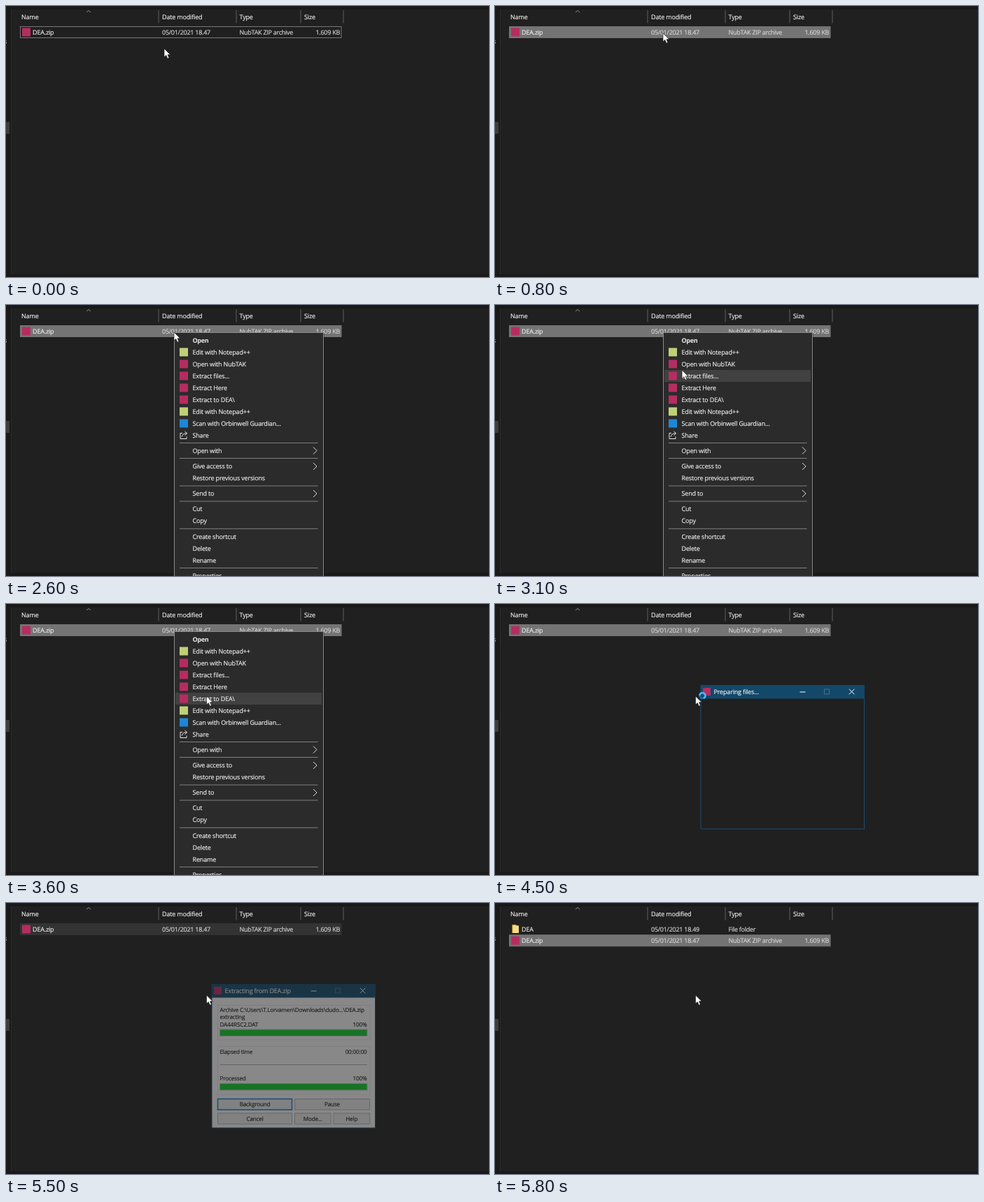
Recreate the animation shown at these times as an HTML page. Size 690 px wide and 388 px high, loop 6.7 s.

```html
<!DOCTYPE html>
<html lang="en">
<head>
<meta charset="utf-8">
<title>Extracting an archive</title>
<style>
  html, body { margin: 0; width: 100%; height: 100%; overflow: hidden; background: #202020; }
  svg { display: block; width: 100vw; height: 100vh; }
  text { font: 9px "Open Sans", "Noto Sans", sans-serif; letter-spacing: -.17px; fill: #ececec;
         stroke: #ececec; stroke-width: .18px; text-rendering: geometricPrecision; white-space: pre; }
  .cell { fill: #d2d2d2; stroke: #d2d2d2; letter-spacing: -.26px; }
  .bold { font-weight: 700; letter-spacing: -.3px; stroke: none; }
  .form text { font-size: 8.2px; letter-spacing: -.2px; fill: #111; stroke: #111; stroke-width: .1px; }
  .end { text-anchor: end; }
  .mid { text-anchor: middle; }
</style>
</head>
<body>
<svg id="stage" viewBox="0 0 690 388"></svg>
<script>
const LOOP = 6700, STEP = 100;
const stage = document.getElementById('stage');

function add(parent, tag, attrs = {}, content) {
  const el = document.createElementNS('http://www.w3.org/2000/svg', tag);
  for (const k in attrs) el.setAttribute(k, attrs[k]);
  if (content !== undefined) el.textContent = content;
  return parent.appendChild(el);
}
const set = (el, attrs) => { for (const k in attrs) el.setAttribute(k, attrs[k]); };
const group = (parent, attrs) => add(parent, 'g', attrs);
const rect = (parent, x, y, width, height, fill, more) =>
  add(parent, 'rect', { x, y, width, height, fill, ...more });
const line = (parent, d, stroke, width = 1) =>
  add(parent, 'path', { d, stroke, 'stroke-width': width, fill: 'none' });
const label = (parent, x, y, str, cls = '') => add(parent, 'text', { x, y, class: cls }, str);
const show = (el, on) => el.setAttribute('visibility', on ? 'visible' : 'hidden');

const clamp = v => Math.max(0, Math.min(1, v));
const ramp = (t, a, b) => clamp((t - a) / (b - a));
const ease = p => p * p * (3 - 2 * p);
const mix = (a, b, p) => a + (b - a) * p;

const ARCHIVER = '#b52d60', EDITOR = '#bfd079', GUARD = '#1d86d6';

// Explorer
rect(stage, 0, 0, 690, 388, '#202020');
rect(stage, 0, 0, 8, 388, '#1a1a1a');
rect(stage, 7, 5, 1, 379, '#2c2c2c');
rect(stage, 0, 0, 690, 5, '#191919');
rect(stage, 0, 384, 690, 4, '#191919');
rect(stage, 0, 166, 5, 17, '#3d3d3d');
label(stage, -3, 54, 's').style.fill = '#b98b62';
line(stage, 'M115 9L118 6.5L121 9', '#8a8a8a');
[218, 329, 421, 482].forEach(x => rect(stage, x - .5, 6, 1, 18.5, '#5e5e5e'));
[[22, 'Name'], [223, 'Date modified'], [333.5, 'Type'], [426, 'Size']]
  .forEach(([x, s]) => label(stage, x, 18.5, s));

function fileRow(name, time, type, size) {
  const g = group(stage);
  const back = rect(g, 20.5, 29.5, 458.5, 16, 'none');
  label(g, 38, 41, name);
  label(g, 223, 41, '05/01/2021 ' + time, 'cell');
  label(g, 333.5, 41, type, 'cell');
  label(g, 477, 41, size, 'cell end');
  return { g, back };
}
const folder = fileRow('DEA', '18.49', 'File folder', '');
add(folder.g, 'path', { d: 'M24.5 31H30L31 32.5H33.5V43H24.5Z', fill: '#e2b84c' });
rect(folder.g, 25.5, 32.5, 8.5, 10.5, '#f8dc82');
const zip = fileRow('DEA.zip', '18.47', 'NubTAK ZIP archive', '1.609 KB');
rect(zip.g, 23, 31.5, 12, 12, ARCHIVER);

// Context menu
const menu = group(stage);
rect(menu, 242, 41, 213, 350, '#000', { opacity: .3 });
rect(menu, 240.5, 39.5, 213, 352, '#2b2b2b', { stroke: '#8a8a8a' });
const hover = rect(menu, 242, 0, 209, 17, '#414141');
const items = [
  [50.5, 'Open'],
  [67.5, 'Edit with Notepad++', EDITOR],
  [84.5, 'Open with NubTAK', ARCHIVER],
  [101.5, 'Extract files...', ARCHIVER],
  [118.5, 'Extract Here', ARCHIVER],
  [135.5, 'Extract to DEA\\', ARCHIVER],
  [152.5, 'Edit with Notepad++', EDITOR],
  [169.5, 'Scan with Orbinwell Guardian...', GUARD],
  [186.5, 'Share'],
  [208.5, 'Open with'], [231, 'Give access to'], [248, 'Restore previous versions'],
  [270, 'Send to'], [292.2, 'Cut'], [309.2, 'Copy'],
  [331.5, 'Create shortcut'], [348.5, 'Delete'], [365.5, 'Rename'], [387.5, 'Properties']
];
for (const [y, name, icon] of items) {
  label(menu, 266.5, y + 3.2, name, name === 'Open' ? 'bold' : '');
  if (icon) rect(menu, 248, y - 6, 12, 12, icon);
}
[197.5, 219.5, 259, 281, 320.3, 376.5]
  .forEach(y => line(menu, `M248 ${y}H445.5`, '#808080'));
[208.5, 231, 270].forEach(y => line(menu, `M439 ${y - 5}L444 ${y}L439 ${y + 5}`, '#ddd'));
line(menu, 'M252 183.5H249V191.5H258V188.5M251.5 188.5C252 185 254 183.8 258 183.8M255.5 181L258.7 183.8L255.5 186.6', '#e8e8e8');

// Progress window
const win = group(stage);
const body = rect(win, 294, 116.5, 233.5, 205.5, '#202020', { stroke: '#1c4c70' });
rect(win, 294, 116, 234, 19.5, '#13486a');
rect(win, 297, 120, 11, 11, ARCHIVER);
const title = label(win, 312.5, 129, '');
line(win, 'M435.5 126H443.5', '#fff');
line(win, 'M470.5 122H477.5V129H470.5Z', '#4d7087');
line(win, 'M505.8 121.8L513.4 129.4M513.4 121.8L505.8 129.4', '#fff');

const form = group(win, { class: 'form' });
rect(form, 302.5, 146.5, 217.5, 49.5, 'none', { stroke: '#dcdcdc' });
rect(form, 302.5, 205.5, 217.5, 68.5, 'none', { stroke: '#dcdcdc' });
label(form, 305.5, 156, 'Archive C:\\Users\\T.Lorvamen\\Downloads\\dudo...\\DEA.zip');
label(form, 305.5, 165.5, 'extracting');
label(form, 305.5, 176.5, 'DA44RSC2.DAT');
label(form, 305.5, 215.5, 'Elapsed time');
label(form, 515.5, 215.5, '00:00:00', 'end');
label(form, 305.5, 254, 'Processed');
const filePct = label(form, 515.5, 176.5, '', 'end');
const totalPct = label(form, 515.5, 254, '', 'end');
line(form, 'M306 231.5H516', '#a5a5a5');

function progressBar(y) {
  rect(form, 305.5, y, 210.5, 9.5, '#e6e6e6', { stroke: '#bcbcbc' });
  return rect(form, 306, y + .5, 0, 8.5, '#12c52c');
}
const fileBar = progressBar(181), totalBar = progressBar(258.5);

function button(x, y, w, name, focus) {
  rect(form, x, y, w, 15.5, '#e1e1e1',
    { stroke: focus ? '#1a7cd2' : '#adadad', 'stroke-width': focus ? 1.6 : 1 });
  label(form, x + w / 2, y + 10.7, name, 'mid');
}
button(302.5, 280.5, 106, 'Background', true);
button(412.5, 280.5, 107, 'Pause');
button(302.5, 301, 106, 'Cancel');
button(412.5, 301, 51.5, 'Mode...');
button(468, 301, 51.5, 'Help');

// Pointer
const cursor = group(stage);
add(cursor, 'path', {
  d: 'M0 0V12L2.8 9.5L4.8 14.2L6.9 13.3L5 8.7H8.7Z',
  fill: '#fff', stroke: '#111', 'stroke-width': .6
});
const busy = group(cursor);
add(busy, 'circle', { cx: 10, cy: -1, r: 4, fill: 'none', stroke: '#176fae', 'stroke-width': 2.6 });
const spin = add(busy, 'circle', {
  cx: 10, cy: -1, r: 4, fill: 'none', stroke: '#48b9f2', 'stroke-width': 2.6, 'stroke-dasharray': '17 8.2'
});

function pointerAt(t) {
  const a = ramp(t, 0, 200), b = ease(ramp(t, 2600, 3500));
  return [mix(mix(226, 240, a), 286.5, b), mix(mix(61, 39, a), 132, b)];
}

function rowFill(t) {
  if (t < 100) return 'none';
  if (t < 400) return '#4d4d4d';
  if (t < 500) return '#626262';
  return t >= 4600 && t < 5800 ? '#333' : '#747474';
}

function update(time) {
  const t = Math.floor(time / STEP) * STEP;
  const [x, y] = pointerAt(t);
  set(cursor, { transform: `translate(${x} ${y})` });
  show(busy, t >= 4200 && t < 4800);
  set(spin, { transform: `rotate(${t * .36} 10 -1)` });

  const done = t >= 5800, fillColor = rowFill(t);
  show(folder.g, done);
  set(zip.g, { transform: `translate(0 ${done ? 16.3 : 0})` });
  set(zip.back, { fill: fillColor, stroke: t < 100 ? '#777' : fillColor });

  set(menu, { opacity: ramp(t, 1800, 2000) * (1 - ramp(t, 4000, 4200)) });
  const row = items.find(([c]) => Math.abs(y - c + 1) <= 8.5);
  show(hover, t > 2600 && row);
  if (row) set(hover, { y: row[0] - 8.5 });

  const open = ramp(t, 4200, 4500), size = mix(.92, 1, ease(open));
  set(win, {
    opacity: open * (1 - ramp(t, 5400, 5600)),
    transform: `translate(411 219) scale(${size}) translate(-411 -219)`
  });
  const ready = t >= 4800;
  show(form, ready);
  set(body, { fill: ready ? '#f0f0f0' : '#202020' });
  title.textContent = ready ? 'Extracting from DEA.zip' : 'Preparing files...';
  filePct.textContent = t < 4900 ? '0%' : t < 5000 ? '15%' : '100%';
  totalPct.textContent = t < 4900 ? '0%' : t < 5000 ? '74%' : '100%';
  const grow = ramp(t, 4900, 5400), started = t >= 4900;
  set(fileBar, { width: started ? mix(10.5, 209.5, grow) : 0 });
  set(totalBar, { width: started ? mix(12, 209.5, grow) : 0 });
}

const start = performance.now();
function tick() {
  update((performance.now() - start) % LOOP);
  requestAnimationFrame(tick);
}
tick();
</script>
</body>
</html>
```
